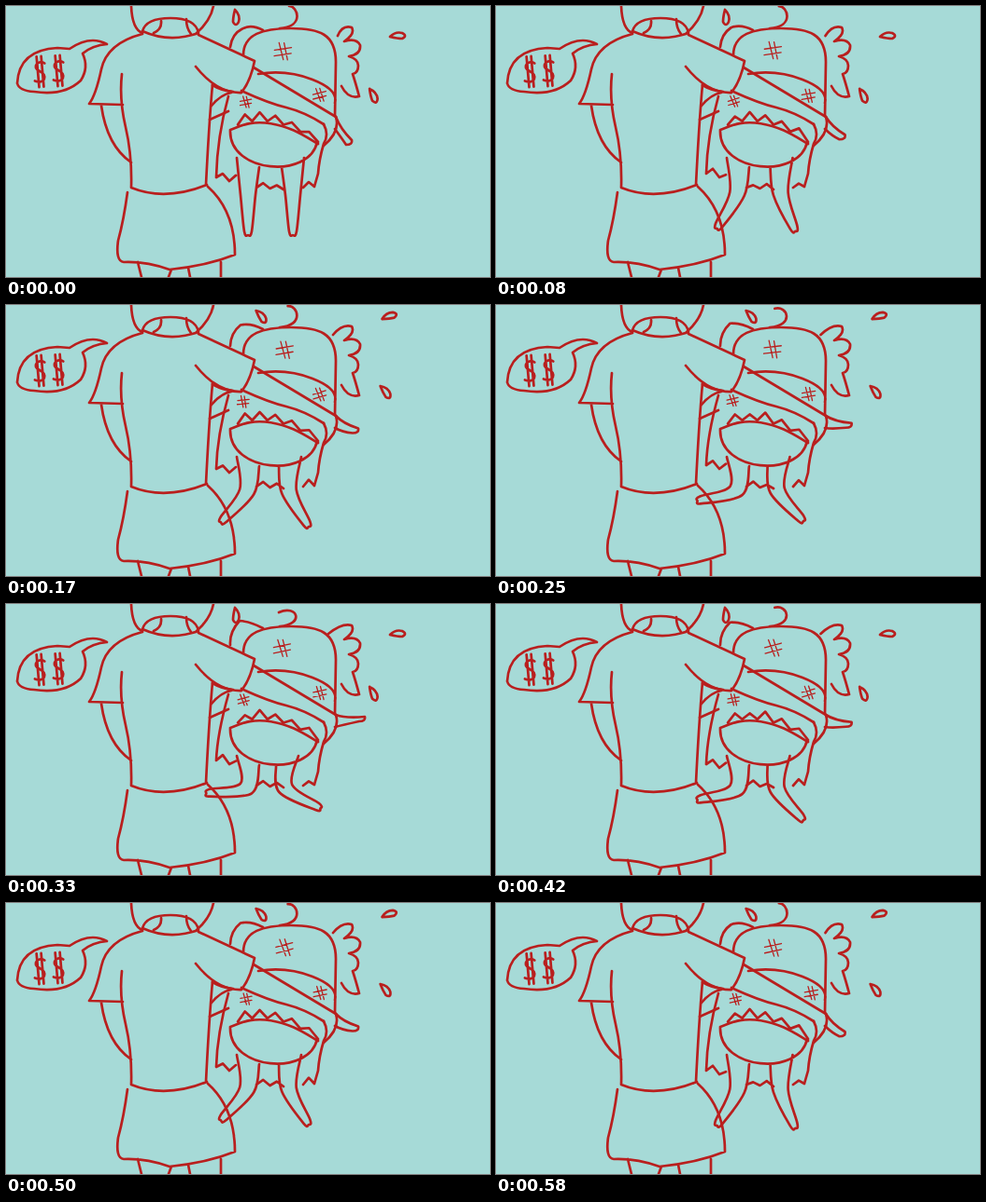
Recreate the animation shown at these times as an HTML page. Size 518 by 291 pixels, loop 0.66 s.

```html
<!DOCTYPE html>
<html lang="en">
<head>
<meta charset="utf-8">
<title>Carried away</title>
<style>
  html, body { margin: 0; width: 100%; height: 100%; overflow: hidden; background: #a6dad7; }
  svg { display: block; width: 100%; height: 100%; }
  path { fill: none; stroke: #b91f1e; stroke-width: 2.7; stroke-linecap: round; stroke-linejoin: round; }
  .thin { stroke-width: 1.3; }
</style>
</head>
<body>
<svg viewBox="0 0 518 291">
  <defs>
    <path id="dollar" d="M6,-8C0,-13 -9,-5 0,0S4,15 -6,10M-2,-16V17M3,-16V17"/>
    <path id="drop" d="M-1,-8Q5,-2 3,5Q0,11 -3,5Q-3,0 -1,-8"/>
    <path id="hash" class="thin" d="M-.5,-1L.1,1M.1,-1L.6,1M-1,-.1L1,-.5M-1,.6L1,.2" vector-effect="non-scaling-stroke"/>
  </defs>
  <!-- head, collar -->
  <path d="M134,0Q135,25 146,29M222,0Q219,16 203,30
           M146,27Q150,13 176,13Q203,13 206,29Q175,40 146,27M166,16Q167,25 158,29M193,14Q193,24 198,30"/>
  <!-- shirt, arms -->
  <path d="M146,30Q108,40 102,68T89,105L125,106M124,73Q121,100 128,130T134,195Q170,210 215,192
           M221,84Q217,130 214,192M203,65Q226,94 252,93M206,31L266,59Q262,80 252,93
           M102,107Q108,150 134,168M265,66L353,119M252,91Q280,104 300,109T340,127"/>
  <!-- shorts, legs -->
  <path d="M130,200Q126,230 120,252Q117,274 126,275Q150,274 175,283Q215,279 245,267Q245,220 216,194
           M141,275l4,16M177,283l-3,8M195,281l2,10M230,275v16"/>
  <!-- speech bubble -->
  <path d="M12,83Q14,47 55,45L68,46Q90,31 108,41Q93,42 82,51Q89,66 80,80Q62,97 30,92Q14,91 12,83"/>
  <use href="#dollar" transform="translate(36 70) rotate(-5)"/>
  <use href="#dollar" transform="translate(56 69) rotate(-5)"/>
  <!-- the child's head and arm -->
  <path d="M254,53C254,30 275,24 305,24S353,30 353,60L352,118M270,73Q300,68 328,79T352,104
           M221,85Q231,91 243,92M220,107Q230,95 241,93M218,122L238,113M353,119Q358,135 340,150"/>
  <path id="child"/>
  <g id="accents"></g>
</svg>
<script>
const child = document.getElementById('child');
const accents = document.getElementById('accents');

function seeded(seed) {
  return () => {
    const v = Math.sin(++seed * 127.1) * 43758.5453;
    return v - Math.floor(v);
  };
}

const add = (p, v, k = 1) => [p[0] + v[0] * k, p[1] + v[1] * k];
const mix = (a, b, t) => a + (b - a) * t;

// Catmull-Rom curve through the points.
function smooth(points) {
  return points.slice(1).reduce((d, end, i) => {
    const from = points[i];
    const before = points[i - 1] || from, after = points[i + 2] || end;
    const c1 = from.map((v, k) => v + (end[k] - before[k]) / 6);
    const c2 = end.map((v, k) => v - (after[k] - from[k]) / 6);
    return `${d}C${c1} ${c2} ${end}`;
  }, 'M' + points[0]);
}

// Ragged cloth: peaks and valleys along a path given as t -> [x, y].
function ragged(path, count, height, random) {
  const points = Array.from({ length: count + 1 }, (_, i) => {
    const [x, y] = path(i / count);
    return [x, y - (i % 2) * height * (0.6 + 0.6 * random())];
  });
  return 'M' + points.join('L');
}
const line = (x1, y1, x2, y2) => t => [mix(x1, x2, t), mix(y1, y2, t)];
const waist = t => [mix(mix(240, 280, t), mix(280, 334, t), t), mix(mix(133, 112, t), mix(112, 148, t), t)];

// A tapering leg; side is -1 for left and 1 for right, bend is the knee angle.
function leg(x, side, bend, kneeY) {
  const a = bend * Math.PI / 180;
  const along = [side * Math.sin(a), Math.cos(a)];
  const across = [Math.cos(a), -side * Math.sin(a)];
  const kneeAcross = [Math.cos(a / 2), -side * Math.sin(a / 2)];
  const knee = [x - 2 * Math.sin(a), kneeY];
  const toe = add(knee, along, 39);
  return smooth([
    [x - 12, 168 + side * 5], add(knee, kneeAcross, -8), add(toe, across, -4),
    add(toe, along, 4),
    add(toe, across, 4), add(knee, kneeAcross, 8), [x + 12, 168 - side * 5]
  ]);
}

// Bends of the left and right knee while the legs swing up.
const bends = [[0, 0], [30, 21], [40, 29], [75, 40], [83, 60]];

function drawChild(swing) {
  const lift = swing / 4;
  const random = seeded(swing * 20);
  const kneeY = 203 - 5 * lift;
  const [left, right] = bends[swing];
  const clothEnd = 184 - 16 * lift;
  child.setAttribute('d', [
    leg(259, -1, left, kneeY),
    leg(307 - 6 * lift, 1, right, kneeY),
    // seat and waistband
    'M240,133C238,180 325,186 333,146',
    smooth([0, 0.25, 0.5, 0.75, 1].map(waist)),
    ragged(t => add(waist(0.1 + 0.9 * t), [0, -2]), 10, 8, random),
    // hanging cloth
    `M238,97Q226,140 225,${clothEnd}`,
    ragged(line(225, clothEnd, 246, clothEnd + 6), 3, 7, random),
    'M340,127Q346,138 340,148Q335,165 334,180L330,194',
    ragged(line(330, 194, 318, 195), 2, 6, random),
    ragged(line(268, 195, 297, 197), 4, 5, random),
    // hand
    `M353,119Q${mix(358, 364, lift)},${mix(132, 123, lift)} ${mix(370, 384, lift)},${mix(144, 121, lift)}` +
      `q1,5 -6,5Q360,${mix(143, 130, lift)} 352,132`,
    // hair and bobble
    `M240,44Q${mix(242, 239, lift)},30 ${mix(252, 250, lift)},${mix(25, 18, lift)}Q262,19 275,26`,
    `M${mix(355, 345, lift)},32Q360,20 370,23Q374,30 362,38Q375,34 379,42Q380,52 367,54` +
      `Q377,57 377,64Q377,72 371,73Q374,82 378,97Q366,100 359,86`,
    `M${mix(303, 292, lift ** 3)},${mix(0, 9, lift ** 3)}C312,0 320,22 293,24`
  ].join(''));
}

// Two alternating sets of drops: x, y, angle.
const drops = [
  [[246, 12, 0], [419, 32, -90], [393, 96, -22]],
  [[273, 12, -35], [410, 12, -105], [406, 93, -35]]
];
const patches = [[297, 48, 9], [255, 103, 6], [336, 96, 7]];

function drawAccents(step) {
  const random = seeded(step * 30);
  const jitter = size => (random() - 0.5) * size;
  accents.innerHTML =
    drops[(step >> 1) % 2].map(([x, y, angle]) =>
      `<use href="#drop" transform="translate(${x} ${y}) rotate(${angle})"/>`).join('') +
    patches.map(([x, y, size]) =>
      `<use href="#hash" transform="translate(${x + jitter(4)} ${y + jitter(2)}) rotate(${jitter(12)}) scale(${size})"/>`).join('');
}

const starts = [0, 80, 170, 250, 330, 420, 500, 580];
const loop = 660;
const began = performance.now();
let shown = -1;

function tick() {
  const time = (performance.now() - began) % loop;
  const step = starts.findLastIndex(t => t <= time);
  if (step !== shown) {
    shown = step;
    drawChild(4 - Math.abs(4 - step));
    drawAccents(step);
  }
  requestAnimationFrame(tick);
}
tick();
</script>
</body>
</html>
```
